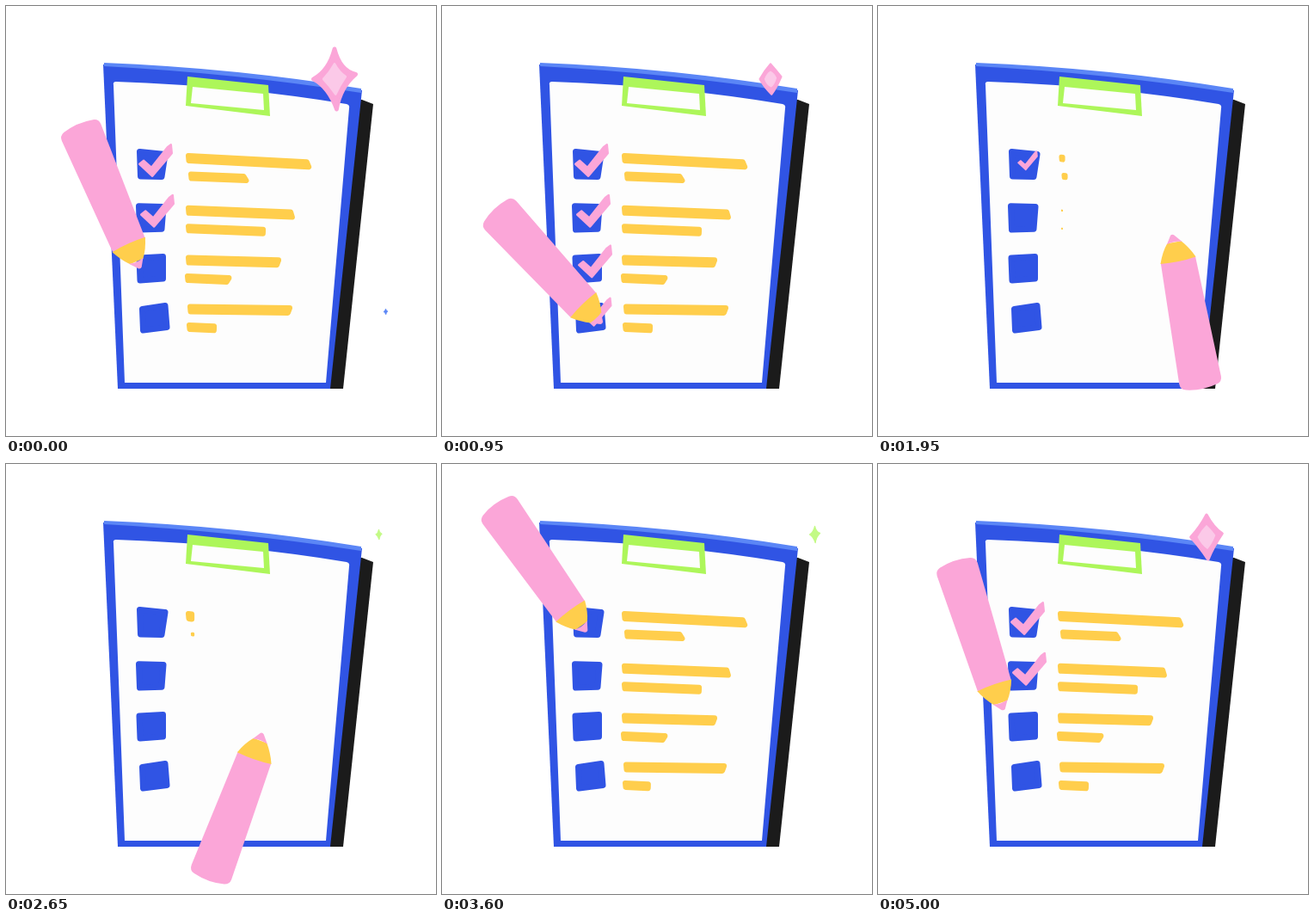
These frames come from a looping animation (500x500 px, 5050 ms). An HTML page with a canvas:

```html
<!DOCTYPE html>
<html lang="en">
<head>
<meta charset="utf-8">
<title>Checklist</title>
<style>
  html, body { margin: 0; width: 100%; height: 100%; overflow: hidden; background: #fff; }
  canvas { display: block; width: 100vw; height: 100vh; object-fit: contain; }
</style>
</head>
<body>
<canvas id="stage" width="500" height="500"></canvas>
<script>
const ctx = document.getElementById('stage').getContext('2d');
const LOOP = 5050, STEP = 50;
const BLUE = '#3054e4', SKY = '#5b86f6', PINK = '#fba6d8', BLUSH = '#fbc9e8',
      YELLOW = '#ffce4c', GREEN = '#adf65a', INK = '#1b1b1b', PAPER = '#fdfdfd';

// The checklist is empty at this time; its story is told on a clock that starts here.
const EMPTY = 2500;
const CLEARING = 4340;

// Each row: box centre, then left edge and width of its long and short line
const ROWS = [
  { box: [170, 184], x: [209, 212], width: [145, 69] },
  { box: [169, 246], x: [209, 209], width: [126, 93] },
  { box: [169.5, 305], x: [209, 208], width: [110, 53] },
  { box: [173, 363], x: [211, 210], width: [121, 35] }
];
const TICK = [[-20, 5], [-15, 1], [-6, 9], [15, -17], [19, -20], [20, -10], [-5, 19]];

const tickCentre = row => [174 + 2 * row, 180 + 58.7 * row];
const tickStart = row => 1200 + 735 * row;

const STARS = [
  { x: 382, y: 85, rx: 26, ry: 37, color: PINK, inner: BLUSH, life: 800, starts: [875, 3600, 4890] },
  { x: 433.5, y: 82, rx: 10, ry: 16, color: '#c3fa85', life: 600, starts: [2110, 3505, 4070] },
  { x: 441.5, y: 355.5, rx: 9, ry: 12.5, color: SKY, life: 600, starts: [1130, 2980, 4070, 5005] }
];

// Pencil pose: time, tip x, tip y, degrees clockwise from upright
const TRAVEL = [
  [0, 156, 305, 157], [950, 186, 369, 137.2], [1700, 350, 248, 20], [1950, 342, 266, -10.5],
  [2450, 316, 314, 4], [2650, 298, 313, 20.5], [3000, 302, 228, 86], [3450, 154, 181, 145],
  [3600, 168, 195, 144.7], [4350, 163, 246, 145.6], [5000, 146, 286, 162.2]
];
// Every tick adds a downstroke and an upstroke
const STROKES = ROWS.flatMap((_, row) => {
  const [x, y] = tickCentre(row), start = tickStart(row) + EMPTY, lean = 147 - row * row;
  return [
    [(start + 40) % LOOP, x - 4, y + 17, lean],
    [(start + 170) % LOOP, x + 16, y - 16, lean]
  ];
});
const POSES = [...TRAVEL, ...STROKES].sort((a, b) => a[0] - b[0]);

const clamp = v => Math.max(0, Math.min(1, v));
const easeOut = v => 1 - (1 - clamp(v)) ** 3;
const easeInOut = v => (v = clamp(v), v < .5 ? 2 * v * v : 1 - 2 * (1 - v) ** 2);

function placed(x, y, scale, draw) {
  if (scale <= 0) return;
  ctx.save();
  ctx.translate(x, y);
  ctx.scale(scale, scale);
  draw();
  ctx.restore();
}

function fillPath(color, draw) {
  ctx.fillStyle = color;
  ctx.beginPath();
  draw();
  ctx.closePath();
  ctx.fill();
}

function roundEdge(color, r) {
  ctx.strokeStyle = color;
  ctx.lineWidth = 2 * r;
  ctx.lineJoin = 'round';
  ctx.stroke();
}

// Polygon with corners rounded by r inside its outline
function poly(color, points, r = 0) {
  const mean = axis => points.reduce((sum, p) => sum + p[axis], 0) / points.length;
  const cx = mean(0), cy = mean(1);
  fillPath(color, () => points.forEach(([x, y]) =>
    ctx.lineTo(x - Math.sign(x - cx) * r, y - Math.sign(y - cy) * r)));
  if (r) roundEdge(color, r);
}

function drawBoard() {
  poly(INK, [[400, 107], [414, 109], [427, 114], [392, 445], [370, 445]]);
  fillPath(BLUE, () => {
    ctx.moveTo(113, 68);
    ctx.quadraticCurveTo(270, 74, 414, 98);
    ctx.lineTo(377, 445);
    ctx.lineTo(130, 445);
  });
  fillPath(SKY, () => {
    ctx.moveTo(114, 66);
    ctx.quadraticCurveTo(265, 72, 413, 96);
    ctx.lineTo(413, 101);
    ctx.quadraticCurveTo(265, 78, 114, 70);
  });
  fillPath(PAPER, () => {
    ctx.moveTo(128, 88);
    ctx.quadraticCurveTo(270, 93, 396, 114);
    ctx.quadraticCurveTo(400, 115, 399, 119);
    ctx.lineTo(372, 438);
    ctx.lineTo(138, 438);
    ctx.lineTo(125, 92);
    ctx.quadraticCurveTo(124, 88, 128, 88);
  });
  poly(GREEN, [[211, 82], [305, 92], [307, 128], [209, 116]]);
  poly(PAPER, [[217, 94], [299, 102], [300, 121], [215, 113]]);
}

function drawBox([x, y], row) {
  placed(x, y, 1, () => poly(BLUE, [
    [-18, -18 + 1.3 * row], [18.5 - row, -15 - row], [14.5 + row, 18 - 1.3 * row], [-17, 17.5]
  ], 3.5));
}

// A line pops up as a dot, then stretches; clearing runs the same way back.
function drawLine(row, part, clock) {
  const { box, x, width } = ROWS[row];
  const shown = (clock - 70 - 190 * row - 50 * part) / 500;
  const left = (4550 - 36 * row - clock) / 500;
  const p = Math.min(shown, left);
  const e = easeInOut((p - .14) / .86), dot = 10;
  const w = dot + (width[part] - dot) * e;
  const dy = w * (part ? .038 : .05 - .0125 * row);
  const slant = -1.4 * Math.cos((2 * row + part) * .75 - .6) * e;
  const h = (part ? 11 : 12) / 2;
  placed(x[part] + dot / 2, box[1] - 7 - 1.2 * row + 21 * part, clamp(p / .14), () => {
    ctx.translate(-dot / 2, 0);
    poly(YELLOW, [[0, -h], [w + slant, dy - h], [w - slant, dy + h], [.5, h]], 3.2);
  });
}

function drawTick(row, clock) {
  const drawn = easeOut((clock - tickStart(row)) / 190);
  const erased = clamp((clock - CLEARING + 100 * row) / 250) ** 2;
  placed(...tickCentre(row), drawn * (1 - erased), () => poly(PINK, TICK, 1.2));
}

function starShape(color, rx, ry, waist) {
  const tips = [[1, -.16], [.1, 1], [-1, 0], [0, -1]];
  fillPath(color, () => {
    ctx.moveTo(0, -ry);
    tips.forEach(([x, y], i) => {
      const a = (i - .5) * Math.PI / 2, k = waist * Math.SQRT2;
      ctx.quadraticCurveTo(Math.cos(a) * k * rx, Math.sin(a) * k * ry, x * rx, y * ry);
    });
  });
  roundEdge(color, Math.min(2.5, rx * .1));
}

// Stars pop up swollen, hold, and shrink away pointed.
function drawStar({ x, y, rx, ry, color, inner, life, starts }, t) {
  for (const start of starts) {
    const age = (t - start + LOOP) % LOOP;
    const size = clamp(Math.min(age, life - age) / 150);
    const waist = .27 + (inner && age < 150 ? .6 * (1 - size) : 0);
    placed(x, y, size * .95, () => {
      starShape(color, rx, ry, Math.min(.56, waist));
      if (inner) starShape(inner, rx * .52, ry * .5, Math.min(.7, waist + .16));
    });
  }
}

// Smooth curve through the poses, closed over the loop
function poseAt(t) {
  const n = POSES.length;
  const at = i => {
    const [time, ...pose] = POSES[(i + n) % n];
    return [time + Math.floor(i / n) * LOOP, ...pose];
  };
  const i = POSES.findLastIndex(p => p[0] <= t);
  const [a, b, c, d] = [at(i - 1), at(i), at(i + 1), at(i + 2)];
  const span = c[0] - b[0], u = (t - b[0]) / span;
  return [1, 2, 3].map(j => {
    const rise = c[j] - b[j];
    const m0 = (c[j] - a[j]) / (c[0] - a[0]) * span;
    const m1 = (d[j] - b[j]) / (d[0] - b[0]) * span;
    return b[j] + u * (m0 + u * (3 * rise - 2 * m0 - m1 + u * (m0 + m1 - 2 * rise)));
  });
}

function drawPencil(t) {
  const [x, y, angle] = poseAt(t);
  placed(x, y, 1, () => {
    ctx.rotate(angle * Math.PI / 180);
    fillPath(PINK, () => {
      ctx.moveTo(-19, 30);
      ctx.lineTo(-23.5, 172);
      ctx.quadraticCurveTo(-23.5, 179, -17, 180.5);
      ctx.quadraticCurveTo(2, 185, 20, 180);
      ctx.quadraticCurveTo(26, 178, 26, 172);
      ctx.lineTo(22, 30);
    });
    fillPath(YELLOW, () => {
      ctx.moveTo(-19.5, 31);
      ctx.quadraticCurveTo(2, 33, 22.5, 30);
      ctx.quadraticCurveTo(17, 18, 9, 9);
      ctx.lineTo(-7.5, 9);
      ctx.quadraticCurveTo(-15, 18, -19.5, 31);
    });
    fillPath(PINK, () => {
      ctx.moveTo(-8, 10);
      ctx.quadraticCurveTo(1, 7, 10, 10);
      ctx.lineTo(2, .5);
      ctx.quadraticCurveTo(0, -1, -2, .5);
    });
  });
}

function render(t) {
  const clock = (t - EMPTY + LOOP) % LOOP;
  ctx.fillStyle = '#fff';
  ctx.fillRect(0, 0, 500, 500);
  drawBoard();
  ROWS.forEach(({ box }, row) => {
    drawBox(box, row);
    drawLine(row, 0, clock);
    drawLine(row, 1, clock);
    drawTick(row, clock);
  });
  STARS.forEach(star => drawStar(star, t));
  drawPencil(t);
}

const began = performance.now();
function frame() {
  const t = (performance.now() - began) % LOOP;
  render(Math.floor(t / STEP) * STEP);
  requestAnimationFrame(frame);
}
frame();
</script>
</body>
</html>
```
